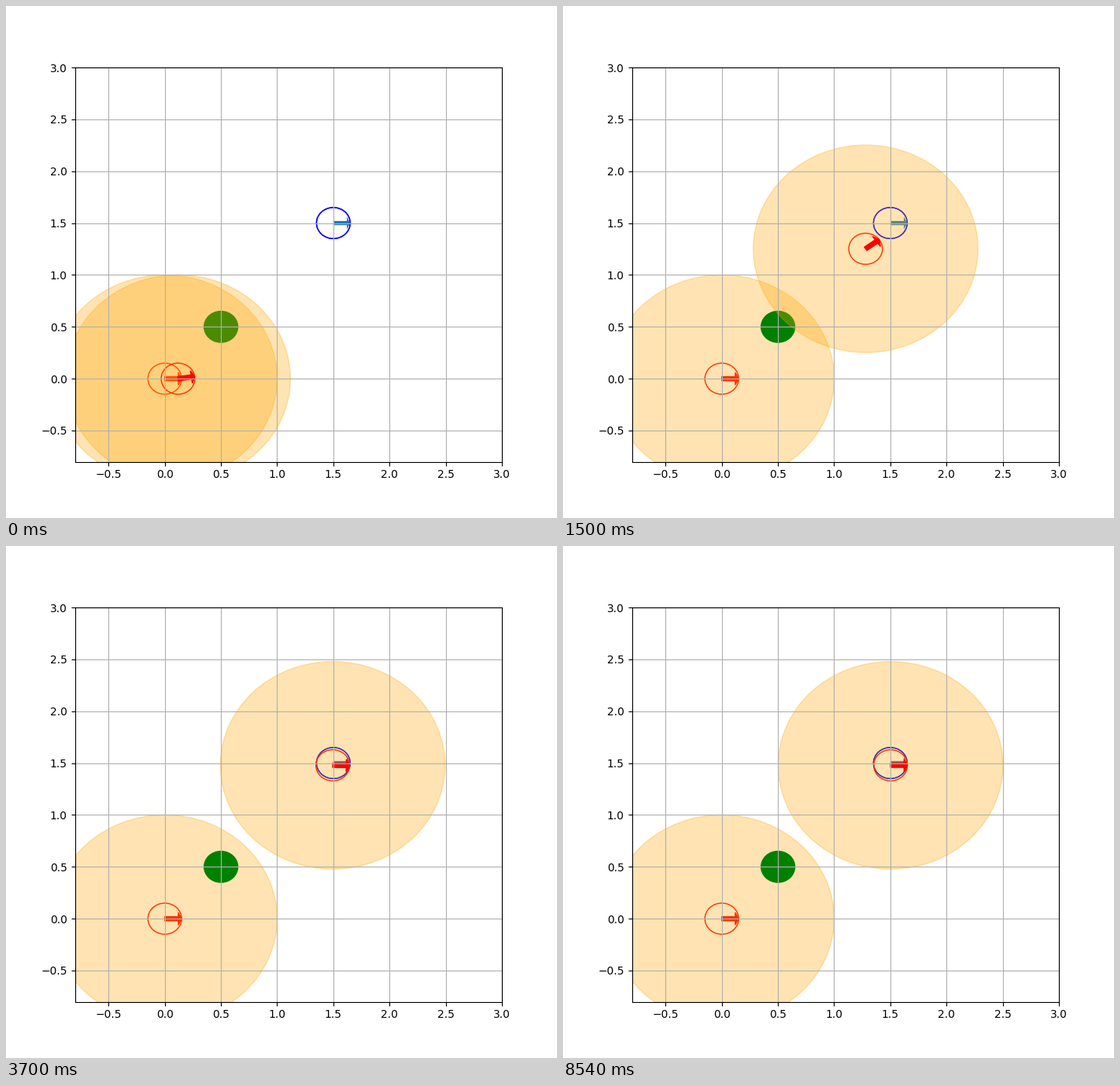
These frames come from a looping animation (700 px wide and 650 px high, 8560 ms). A matplotlib script:

```python
import numpy as np
import matplotlib.pyplot as plt
from matplotlib.animation import FuncAnimation
from matplotlib.patches import Circle, FancyArrow

LOOP_MS, INTERVAL_MS, STEP_MS = 8560, 40, 100
BODY, SENSOR = 0.15, 1.0
CRUISE, BRAKED = 0.12, 20  # distance per step, step at which the robot stops

# key poses: step, x, y, heading in degrees
KEYS = [
    (0, 0.118, 0.0, 8),
    (7, 0.818, 0.423, 60),
    (15, 1.28, 1.252, 36),
    (BRAKED, 1.64, 1.466, 10),
    (29, 1.4625, 1.479, -4),
    (40, 1.502, 1.478, 0),
]


def velocity(step, heading):
    angle = np.radians(heading)
    speed = CRUISE if step < BRAKED else 0
    return speed * np.array([np.cos(angle), np.sin(angle)])


def pose(step):
    """Hermite path through the key poses, then rest at the last one."""
    step = min(step, KEYS[-1][0])
    a, b = next(pair for pair in zip(KEYS, KEYS[1:]) if step <= pair[1][0])
    span = b[0] - a[0]
    s = (step - a[0]) / span
    ease = s * s * (3 - 2 * s)
    x, y = ((1 - ease) * np.array(a[1:3]) + ease * np.array(b[1:3])
            + s * (1 - s) ** 2 * span * velocity(a[0], a[3])
            - s * s * (1 - s) * span * velocity(b[0], b[3]))
    return x, y, np.radians(a[3] + s * (b[3] - a[3]))


def add_ring(x, y, color):
    return ax.add_patch(Circle((x, y), BODY, fill=False, color=color))


def add_sensor(x, y):
    return ax.add_patch(Circle((x, y), SENSOR, color="orange", alpha=0.3))


def add_arrow(x, y, **style):
    return ax.add_patch(FancyArrow(x, y, BODY, 0, width=0.04, head_width=0.12,
                                   head_length=0.03, length_includes_head=True,
                                   **style))


fig, ax = plt.subplots(figsize=(7, 6.5), dpi=100)
ax.set_xlim(-0.8, 3)
ax.set_ylim(-0.8, 3)
ax.grid(True)

# start pose
add_ring(0, 0, "red")
add_arrow(0, 0, color="red")
add_sensor(0, 0)

# goal pose, its outline drawn twice for weight, and the obstacle
for _ in range(2):
    add_ring(1.5, 1.5, "blue")
add_arrow(1.5, 1.5, facecolor="tab:blue", edgecolor="none")
ax.add_patch(Circle((0.5, 0.5), BODY, color="green"))

# moving robot
ring = add_ring(0, 0, "red")
sensor = add_sensor(0, 0)
arrow = add_arrow(0, 0, color="red")


def update(frame):
    step = (frame * INTERVAL_MS + INTERVAL_MS // 2) // STEP_MS
    x, y, heading = pose(step)
    ring.center = sensor.center = x, y
    arrow.set_data(x=x, y=y, dx=BODY * np.cos(heading), dy=BODY * np.sin(heading))
    return ring, sensor, arrow


update(0)
anim = FuncAnimation(fig, update, frames=LOOP_MS // INTERVAL_MS,
                     interval=INTERVAL_MS, repeat=True, repeat_delay=0, blit=False)
plt.show()
```
